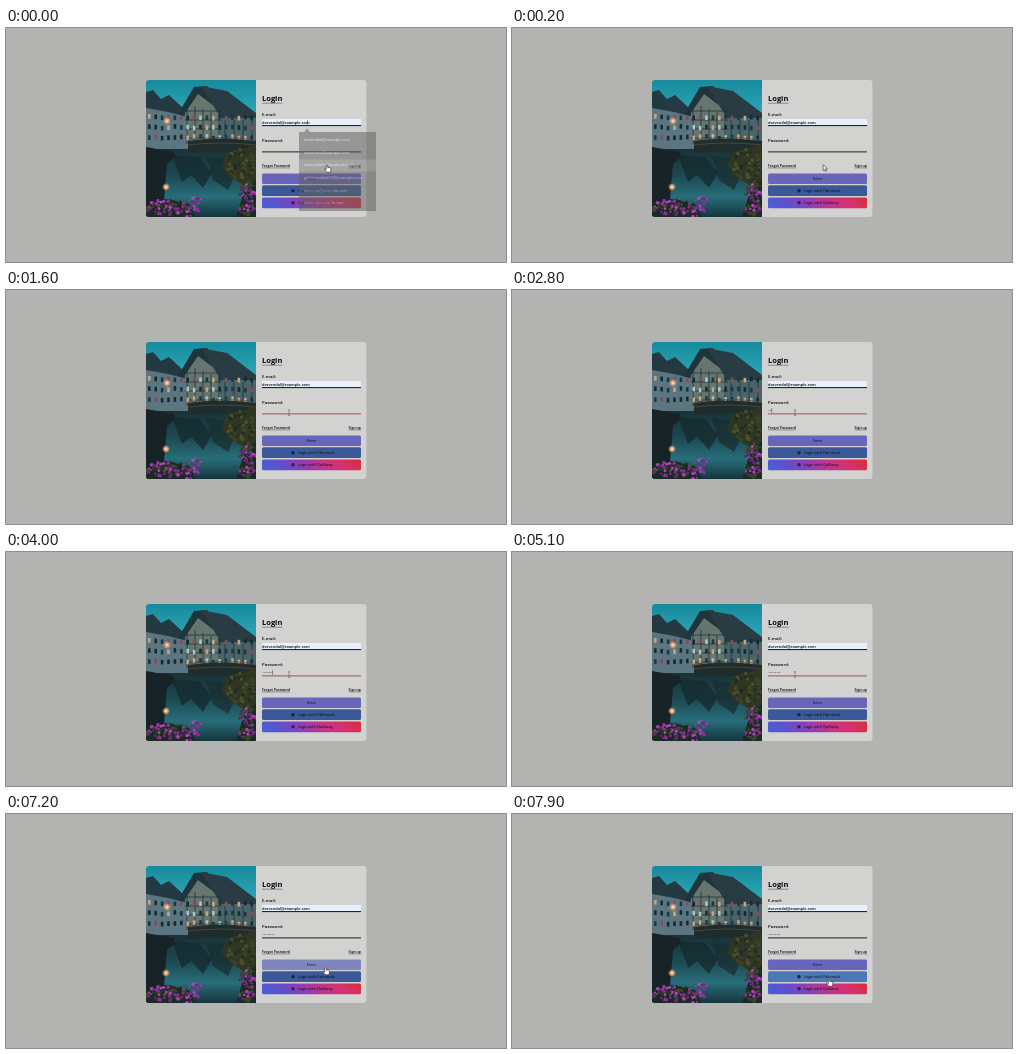
Write an HTML page that moves like this. It is 500 px wide and 234 px high and loops after 8000 ms.

```html
<!DOCTYPE html>
<html lang="en">
<head>
<meta charset="utf-8">
<title>Login form</title>
<style>
html, body { margin: 0; width: 100%; height: 100%; overflow: hidden; background: #b3b3b1; }
svg { display: block; width: 100%; height: 100%; font: 3.75px "Open Sans", "Noto Sans", sans-serif; fill: #080808; }
.title { font-size: 7.5px; font-weight: 700; }
.label { font-size: 4.3px; font-weight: 600; }
.mail { font-size: 3.9px; font-weight: 600; }
.link { font-size: 3.5px; font-weight: 600; text-decoration: underline; }
.mid { text-anchor: middle; }
.end { text-anchor: end; }
.cursor { fill: #fff; stroke: #222; stroke-width: .6; stroke-linejoin: round; }
</style>
</head>
<body>
<svg viewBox="0 0 500 234">
  <defs>
    <clipPath id="card"><rect x="140" y="52" width="220.4" height="137" rx="3"/></clipPath>
    <clipPath id="frame"><path d="M140 52h110v137H140z"/></clipPath>
    <linearGradient id="sky" x2="0" y2="1"><stop stop-color="#178a9c"/><stop offset=".5" stop-color="#2fabba"/></linearGradient>
    <linearGradient id="water" x2="0" y2="1"><stop stop-color="#183338"/><stop offset=".4" stop-color="#1d4a53"/><stop offset=".7" stop-color="#286e7a"/><stop offset="1" stop-color="#15353d"/></linearGradient>
    <linearGradient id="social" gradientUnits="userSpaceOnUse" x1="278" y1="202.5" x2="333" y2="147.5">
      <stop stop-color="#485fd6"/><stop offset=".2" stop-color="#5a52d0"/><stop offset=".4" stop-color="#8a3fb8"/>
      <stop offset=".6" stop-color="#c0358c"/><stop offset=".8" stop-color="#d8306c"/><stop offset="1" stop-color="#d62f36"/>
    </linearGradient>
    <radialGradient id="glow"><stop stop-color="#fff0dc"/><stop offset=".4" stop-color="#eda875"/><stop offset="1" stop-color="#eda875" stop-opacity="0"/></radialGradient>
  </defs>

  <g clip-path="url(#card)">
    <path d="M140 52h221v137H140z" fill="#d2d3d1"/>
    <g clip-path="url(#frame)">
      <path d="M140 52h110v75H140z" fill="url(#sky)"/>
      <path d="M140 76l24 4 22 6v37h-46z" fill="#5b7680"/>
      <path d="M140 64l7-2 8 9 8-4 14 13 5 9-20-5-22-4z" fill="#243a43"/>
      <path d="M179 82l12-20 25 20v34h-37z" fill="#66766f"/>
      <path d="M172 86l16-27 13-1 23 26-4 3-28-21-15 22z" fill="#20343b"/>
      <path d="M195 58l26 5 29 22v10h-32z" fill="#2a3c43"/>
      <path d="M214 90h36v28h-36z" fill="#4a656a"/>
      <g id="beams" stroke="#1d343b" stroke-width=".8" fill="none"/>
      <g id="panes"/>
      <path d="M140 121h110v68H140z" fill="url(#water)"/>
      <path d="M166 127l27 2 13 16-9 15-12-13-9 7z" fill="#142a2e" opacity=".75"/>
      <path d="M200 128l24 3 6 14-8 17-15-10z" fill="#172d30" opacity=".7"/>
      <path d="M182 113q32-5 68 0v13q-32-4-68-1z" fill="#1f2e2d"/>
      <path d="M182 112q34-5 68 0M182 117q34-4 68 0" fill="none" stroke="#5b4740" stroke-width=".8"/>
      <path d="M140 119l28 5 1 5-8 7-3 37-18 16z" fill="#182328"/>
      <path d="M250 116l-14 5-15 3-6 14 9 11 12 7 14 22z" fill="#303624"/>
      <path d="M140 176l19-5 24 5 7 13h-50zM230 189l8-26 12-12v38z" fill="#1a2b25"/>
      <g id="plants"/>
      <circle cx="161" cy="93" r="4" fill="url(#glow)"/>
      <circle cx="160" cy="159" r="4" fill="url(#glow)"/>
    </g>
  </g>

  <text class="title" x="256" y="73.4">Login</text>
  <path d="M256 75.2h20.5" stroke="#555" stroke-width=".6"/>
  <text class="label" x="256" y="88">E-mail:</text>
  <path d="M256 91h99v6.3h-99z" fill="#e8f0fe"/>
  <path d="M256 97.6h99" stroke="#111"/>
  <text class="mail" x="256" y="95.7">dorvendal@example.com</text>
  <path id="mailCaret" d="M301.5 92v4.7" stroke="#222" stroke-width=".5"/>
  <text class="label" x="256" y="113.7">Password:</text>
  <path id="line" d="M256 123.9h99"/>
  <g id="dots"/>
  <path id="caret" d="M0 118.2v4.6" stroke="#444" stroke-width=".6"/>
  <text class="link" x="256" y="138.8">Forgot Password</text>
  <text class="link end" x="355" y="138.8">Sign up</text>

  <rect id="enter" x="256" y="145.4" width="99" height="10.6" rx="1.5"/>
  <text class="mid" x="305.5" y="152">Enter</text>
  <rect id="first" x="256" y="157.2" width="99" height="10.7" rx="1.5"/>
  <circle cx="287" cy="162.7" r="1.7" fill="#17233d"/>
  <text x="292" y="164">Login with Palmnook</text>
  <rect x="256" y="169.5" width="99" height="10.8" rx="1.5" fill="url(#social)"/>
  <circle cx="287" cy="174.8" r="1.7" fill="#3c1c4c"/>
  <text x="292" y="176.2">Login with Quillaray</text>

  <g id="popup">
    <path d="M293 104h5l3-3.5 3 3.5h66v79h-77z" fill="#606060"/>
    <path d="M293 131.5h77v12h-77z" fill="#7c7c7c"/>
    <g id="rows" fill="#fff" font-size="3.9"/>
  </g>

  <g id="pointer" class="cursor">
    <path id="arrow" d="M0 0v5.8l1.4-1.2 1 2.2 1-.5-1-2.1h1.8z"/>
    <path id="hand" d="M-.7 4V.6Q0-.5.7.6v2.2l2.5.6q.9.2.8 1.2L3.5 7.8H-.4L-2.4 5q-.2-1 .6-.8l1.1.9z"/>
    <path id="beam" d="M-1.2-2.8h2.4M0-2.8v5.6M-1.2 2.8h2.4" stroke="#555" stroke-width=".55"/>
  </g>
</svg>

<script>
const $ = id => document.getElementById(id);
const clamp = v => Math.max(0, Math.min(1, v));
const ramp = (t, from, to) => clamp((t - from) / (to - from));
const mix = (a, b, k) => `rgb(${a.map((v, i) => Math.round(v + (b[i] - v) * k))})`;
const show = (id, on) => $(id).style.display = on ? "" : "none";

function add(parent, tag, attrs, text = "") {
  const el = document.createElementNS("http://www.w3.org/2000/svg", tag);
  for (const k in attrs) el.setAttribute(k, attrs[k]);
  el.textContent = text;
  $(parent).append(el);
  return el;
}

let seed = 7;
const rand = () => (seed = seed * 16807 % 2147483647) / 2147483647;
const pick = list => list[Math.floor(rand() * list.length)];

// Timber frames and windows
for (let i = 0; i < 5; i++) add("beams", "path", { d: `M${181 + i * 8} ${78 + Math.abs(i - 1) * 3}V116` });
for (let i = 0; i < 4; i++) add("beams", "path", { d: `M179 ${83 + i * 9}h37M${219 + i * 9} 92v25` });
for (let y = 0; y < 3; y++)
  for (let x = 0; x < 17; x++)
    add("panes", "rect", {
      x: 142 + x * 6.4, y: 86 + y * 10 + rand() * 2, width: 2.6, height: 4.6,
      fill: pick(["#a8c4c6", "#152a31", "#1b3842", "#8a4a5e", "#c2a582"])
    });

// Leaves and blossoms as [centre x, centre y, spread x, spread y, count, colours]
const leaf = ["#3a4527", "#4f4d2b", "#1b2d22"], bloom = ["#8e2d9c", "#b444b8", "#692477"];
const patches = [
  [235, 136, 15, 15, 65, leaf], [161, 180, 23, 9, 45, leaf], [242, 170, 10, 18, 40, leaf],
  [156, 180, 15, 8, 38, bloom], [180, 182, 13, 7, 25, bloom],
  [243, 164, 8, 10, 25, bloom], [190, 173, 6, 4, 12, bloom], [240, 182, 9, 6, 15, bloom]
];
for (const [x, y, w, h, n, colors] of patches)
  for (let i = 0; i < n; i++) {
    const a = rand() * 6.28, r = Math.sqrt(rand());
    add("plants", "circle", {
      cx: x + w * r * Math.cos(a), cy: y + h * r * Math.sin(a),
      r: .7 + rand() * 1.2, fill: colors[i % 3]
    });
  }

["dorvendal@example.com", "dorvenda@example.com", "dorvendalm@example.com",
 "galdorvendal123@example.com", "dorvend@example.com", "dorlen@example.com"]
  .forEach((s, i) => add("rows", "text", { x: 298, y: 113.2 + i * 12.6 }, s));

const keys = [2400, 2800, 3100, 3300, 3500, 3700, 4000, 4400, 4600];
const dots = keys.map((_, i) => add("dots", "circle", { cx: 257 + i * 1.35, cy: 120.4, r: .45, fill: "#40383c" }));

// Pointer path: time, x, y
const path = [
  [0, 321, 136.5], [500, 293, 137], [900, 286, 126], [1100, 283, 118], [1300, 283, 122.6],
  [5600, 283, 122.6], [6500, 319.5, 153], [7200, 319.5, 153], [7900, 317, 164.5], [8000, 317, 164.5]
];
function pointerAt(t) {
  const i = path.findIndex(p => p[0] > t), a = path[i - 1], b = path[i];
  let k = ramp(t, a[0], b[0]);
  k = k * k * (3 - 2 * k);
  return [a[1] + (b[1] - a[1]) * k, a[2] + (b[2] - a[2]) * k];
}

function draw(now) {
  const t = Math.floor(now % 8000 / 100) * 100;

  const [x, y] = pointerAt(t);
  const kind = t < 200 || y > 145.4 ? "hand" : y < 125.5 && y > 115 ? "beam" : "arrow";
  $("pointer").setAttribute("transform", `translate(${x} ${y})`);
  for (const id of ["arrow", "hand", "beam"]) show(id, id === kind);

  $("popup").setAttribute("opacity", .52 * (1 - ramp(t, 0, 200)));
  show("mailCaret", t < 100);

  const focus = ramp(t, 1400, 1600) - ramp(t, 6300, 6700);
  $("line").setAttribute("stroke", mix([30, 30, 30], [156, 78, 96], focus));

  const count = keys.filter(k => k <= t).length;
  dots.forEach((d, i) => d.style.display = i < count ? "" : "none");
  $("caret").setAttribute("transform", `translate(${257 + count * 1.35})`);
  show("caret", t >= 2400 && t < 5100);

  const hover = ramp(t, 6300, 6700) - ramp(t, 7400, 7800);
  $("enter").setAttribute("fill", mix([103, 102, 186], [127, 134, 189], hover));
  $("first").setAttribute("fill", mix([59, 89, 152], [76, 121, 181], ramp(t, 7500, 7900)));
}

const start = performance.now();
function tick() {
  draw(performance.now() - start);
  requestAnimationFrame(tick);
}
tick();
</script>
</body>
</html>
```
